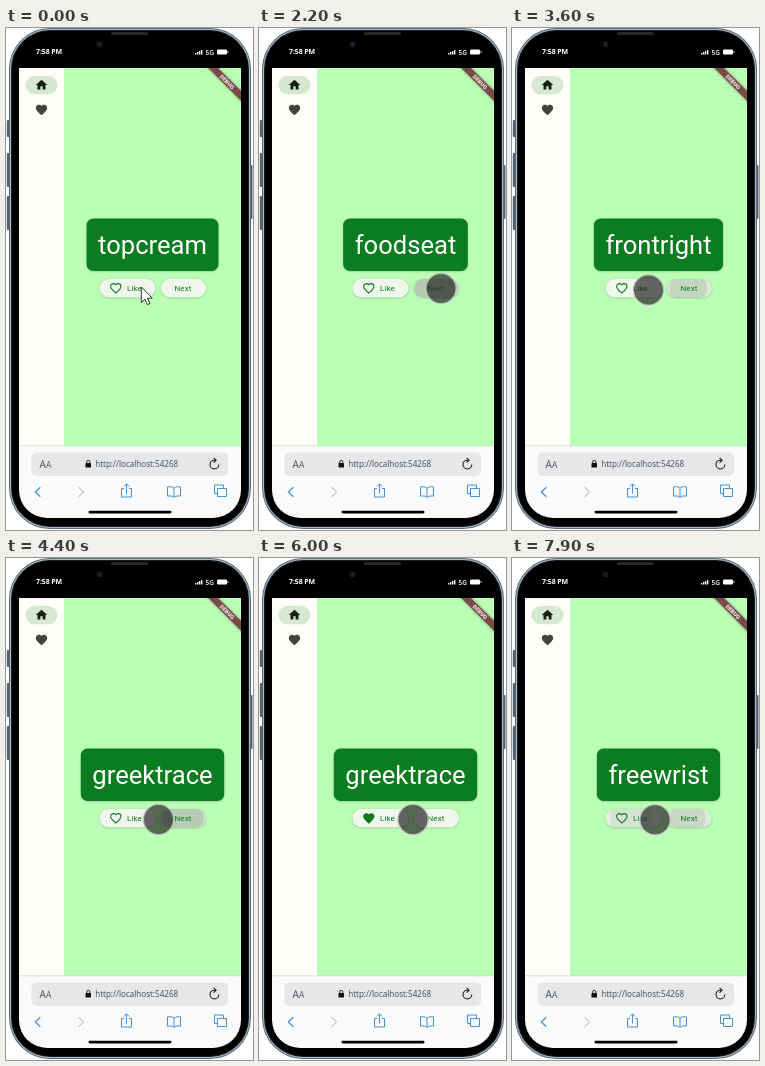
An HTML page with a canvas that plays this animation: 247 by 502 pixels, repeating every 8 s.

```html
<!DOCTYPE html>
<html lang="en">
<head>
<meta charset="utf-8">
<title>Word pair app</title>
<style>
  html, body { margin: 0; width: 100%; height: 100%; overflow: hidden; background: #fff; }
  canvas { display: block; width: 247px; height: 502px; }
</style>
</head>
<body>
<canvas id="stage"></canvas>
<script>
const W = 247, H = 502, LOOP = 8000, STEP = 100;
const TRAVEL = 250, RESPONSE = 100, RIPPLE = 1200;
const canvas = document.getElementById('stage');
const ctx = canvas.getContext('2d');
const ratio = window.devicePixelRatio || 1;
canvas.width = W * ratio;
canvas.height = H * ratio;

const GREEN = '#0b7d20', MINT = '#bbfeb6', BLUE = '#4b8fce', INK = '#3d453c', DARK = '#142012';
const HOME = new Path2D('M10 20v-6h4v6h5v-8h3L12 3 2 12h3v8z');
const HEART = new Path2D('M12 21.35l-1.45-1.32C5.4 15.36 2 12.28 2 8.5 2 5.42 4.42 3 7.5 3c1.74 0 3.41.81 4.5 2.09C13.09 3.81 14.76 3 16.5 3 19.58 3 22 5.42 22 8.5c0 3.78-3.4 6.86-8.55 11.54z');
const ARROW = new Path2D('M0 0V15.5L3.6 12.2 6 17.6 8.6 16.4 6.2 11.2H11Z');

const words = ['topcream', 'foodseat', 'frontright', 'greektrace', 'clipbrick', 'freewrist'];
const spots = {
  like: { x: 136.5, y: 262 }, next: { x: 182, y: 260.5 }, gap: { x: 154, y: 261.5 },
  home: { x: 37, y: 59 }, heart: { x: 37.5, y: 84 },
};
// The pointer travels to each spot, arrives at the given time and may tap there.
const visits = [
  { spot: 'like', arrive: 0 },
  { spot: 'next', arrive: 1900, taps: [2100, 3200] },
  { spot: 'like', arrive: 3600 },
  { spot: 'next', arrive: 4250, taps: [4250] },
  { spot: 'like', arrive: 4500, taps: [4500] },
  { spot: 'heart', arrive: 4800, taps: [4800] },
  { spot: 'home', arrive: 5300, taps: [5600] },
  { spot: 'gap', arrive: 5850 },
  { spot: 'next', arrive: 6260, taps: [6300] },
  { spot: 'like', arrive: 7100, taps: [7150] },
  { spot: 'next', arrive: 7400, taps: [7400] },
  { spot: 'like', arrive: 7960 },
];
const taps = visits.flatMap(({ spot, taps = [] }) => taps.map(at => ({ spot, at })));

function stateAt(t) {
  const state = { index: 0, liked: false, favorites: false };
  for (const { spot, at } of taps) {
    if (at + RESPONSE > t) break;
    if (spot === 'next') { state.index++; state.liked = false; }
    else if (spot === 'like') state.liked = true;
    else state.favorites = spot === 'heart';
  }
  return state;
}

function box(x, y, w, h, r, fill) {
  ctx.beginPath();
  ctx.roundRect(x, y, w, h, r);
  ctx.fillStyle = fill;
  ctx.fill();
}

function disc(x, y, r, fill) {
  ctx.beginPath();
  ctx.arc(x, y, r, 0, 7);
  ctx.fillStyle = fill;
  ctx.fill();
}

function label(str, x, y, font, color, spacing = 0) {
  ctx.font = font;
  ctx.letterSpacing = spacing + 'px';
  ctx.fillStyle = color;
  ctx.fillText(str, x, y);
}

function line(d, color, width = 1.1) {
  ctx.strokeStyle = color;
  ctx.lineWidth = width;
  ctx.stroke(new Path2D(d));
}

function icon(path, cx, cy, size, color, outlined) {
  ctx.save();
  ctx.translate(cx, cy);
  ctx.scale(size / 24, size / 24);
  ctx.translate(-12, -12);
  ctx.fillStyle = ctx.strokeStyle = color;
  ctx.lineWidth = 2.1;
  outlined ? ctx.stroke(path) : ctx.fill(path);
  ctx.restore();
}

function raised(blur, y, alpha, paint) {
  ctx.save();
  ctx.shadowColor = `rgba(0,40,0,${alpha})`;
  ctx.shadowBlur = blur * ratio;
  ctx.shadowOffsetY = y * ratio;
  paint();
  ctx.restore();
}

function phone() {
  const key = '#55636f';
  box(0.8, 92, 3, 17, 1, key);
  box(0.8, 125, 3, 34, 1, key);
  box(0.8, 168, 3, 34, 1, key);
  box(243.5, 137, 3, 54, 1, key);
  ['#5b6b79', '#aebac5', '#1a1d21', '#000'].forEach((color, i) =>
    box(3 + i, i, 242 - 2 * i, 501 - 2 * i, 41 - i, color));
  box(105, 4, 37, 3, 1.5, '#25282b');
  disc(93.5, 16.5, 3, '#171b26');

  label('7:58 PM', 30, 25.5, '700 7px "Open Sans", sans-serif', '#fff', -0.1);
  for (let i = 0; i < 4; i++) box(189 + i * 2, 25 - i, 1.4, 1.5 + i, 0.3, '#fff');
  label('5G', 199.5, 26.5, '600 6.5px "Open Sans", sans-serif', '#fff');
  box(211, 21.5, 10, 5, 1.3, '#fff');
  box(221.5, 23, 0.9, 2, 0.4, '#fff');
}

function browserBar() {
  box(13, 418, 222, 72, [0, 0, 28, 28], '#f8fafb');
  box(13, 417.5, 222, 0.7, 0, '#cfd6d2');
  box(25.5, 424.5, 196.5, 23.5, 5, '#e5e7e9');
  label('A', 33.5, 440, '10px "Open Sans", sans-serif', '#50555b');
  label('A', 40, 440, '8.5px "Open Sans", sans-serif', '#50555b');
  box(79.5, 435, 5.5, 4.6, 0.7, '#111');
  line('M80.7 435.5v-1.6a1.55 1.55 0 0 1 3.1 0v1.6', '#111', 0.9);
  label('http://localhost:54268', 89.2, 439.2, '8.1px "Open Sans", sans-serif', '#444b52');
  line('M212.8 436.6A4.4 4.4 0 1 1 208.4 432.2h1.4M207.6 429.8l2.5 2.4-2.5 2.4', '#222');

  line('M34.3 459.2l-5 4.8 5 4.8', BLUE, 1.2);
  line('M72.6 459.2l5 4.8-5 4.8', '#c9cdd1', 1.2);
  line('M118 460.5h-2.5v8.5h10v-8.5H123M120.5 465.5v-9.5M117.8 458.5l2.7-2.7 2.7 2.7', BLUE, 1);
  line('M168 460.2c-1.5-1.6-4.5-1.6-6.5-1.3v9.2c2-.3 5-.3 6.5 1.2 1.5-1.5 4.5-1.5 6.5-1.2v-9.2c-2-.3-5-.3-6.5 1.3v9', BLUE, 1);
  line('M211.5 460.5h9v8h-9zM211.5 465.5h-3v-8.5h9v3.5', BLUE, 1);
  box(82.5, 482.8, 83, 2.6, 1.3, '#000');
}

function button(spot, text, x, w, textX, t) {
  raised(2, 0.6, 0.3, () => box(x, 251, w, 18.4, 9.2, '#f0f6eb'));
  const tap = taps.filter(tap => tap.spot === spot && tap.at <= t).pop();
  const fade = tap ? Math.max(0, 1 - (t - tap.at) / RIPPLE) : 0;
  if (fade) {
    const inset = 8 * (1 - fade);
    box(x, 251, w, 18.4, 9.2, `rgba(70,150,70,${0.2 * fade})`);
    box(x + inset, 251, w - 3 * inset, 18.4, 9.2 * fade, `rgba(40,60,40,${0.18 * fade})`);
  }
  label(text, textX, 263, '8px Roboto, sans-serif', GREEN, 0.1);
}

function homePage(t, { index, liked }) {
  const font = '25.6px Roboto, sans-serif';
  ctx.font = font;
  ctx.letterSpacing = '0px';
  const width = ctx.measureText(words[index]).width;
  const left = 146.5 - width / 2;
  raised(2, 0.5, 0.25, () => box(left - 11.5, 190.5, width + 23, 52.5, 6.8, GREEN));
  label(words[index], left, 225.8, font, '#fff');
  button('like', 'Like', 93.5, 56, 121, t);
  button('next', 'Next', 155, 45, 168.5, t);
  icon(HEART, 109.8, 260.3, liked ? 13.7 : 12.4, GREEN, !liked);
}

function favoritesPage() {
  label('You have 2 favorites:', 70, 60, '8px Roboto, sans-serif', DARK, 0.14);
  ['pinkmail', 'greektrace'].forEach((word, i) => {
    const y = 88 + i * 27;
    icon(HEART, 74.3, y, 13.7, INK);
    label(word, 88, y + 3, '9.1px Roboto, sans-serif', DARK, 0.28);
  });
}

function app(t) {
  const state = stateAt(t);
  const pillOnHeart = state.favorites && stateAt(t - 200).favorites;
  box(13, 40, 222, 378, 0, MINT);
  box(13, 40, 45, 378, 0, '#fdfef8');
  box(19.3, pillOnHeart ? 73 : 48, 32.2, 18.2, 9.1, '#d7e8d0');
  icon(HOME, 35.5, 57, 13.7, state.favorites ? INK : DARK);
  icon(HEART, 35.5, 82, 13.7, state.favorites ? DARK : INK);
  state.favorites ? favoritesPage() : homePage(t, state);
}

function banner() {
  ctx.save();
  ctx.beginPath();
  ctx.rect(13, 40, 222, 378);
  ctx.clip();
  ctx.translate(235, 40);
  ctx.rotate(Math.PI / 4);
  raised(3, 0, 0.5, () => box(-30, 16.3, 60, 6.8, 0, '#7b4947'));
  ctx.textAlign = 'center';
  label('DEBUG', 0, 21.7, '900 5.6px Roboto, sans-serif', '#f4eeee');
  ctx.restore();
}

function pointer(t) {
  if (t < 1200) {
    ctx.save();
    ctx.translate(135.3, 259);
    ctx.fillStyle = '#fff';
    ctx.fill(ARROW);
    ctx.strokeStyle = '#222';
    ctx.lineWidth = 0.9;
    ctx.stroke(ARROW);
    ctx.restore();
    return;
  }
  const i = visits.findLastIndex(visit => visit.arrive - TRAVEL <= t);
  const from = spots[visits[i - 1]?.spot ?? 'like'], to = spots[visits[i].spot];
  const k = Math.min(1, (t - visits[i].arrive) / TRAVEL + 1);
  const ease = k * k * (3 - 2 * k);
  const x = from.x + (to.x - from.x) * ease, y = from.y + (to.y - from.y) * ease;
  disc(x, y, 15.2, 'rgba(38,38,38,.7)');
  ctx.strokeStyle = 'rgba(200,207,200,.8)';
  ctx.lineWidth = 1.5;
  ctx.stroke();
}

function draw(now) {
  const t = Math.floor((now % LOOP) / STEP) * STEP;
  ctx.setTransform(ratio, 0, 0, ratio, 0, 0);
  ctx.clearRect(0, 0, W, H);
  phone();
  app(t);
  banner();
  browserBar();
  pointer(t);
}

const start = performance.now();
function frame() {
  draw(performance.now() - start);
  requestAnimationFrame(frame);
}
frame();
</script>
</body>
</html>
```
